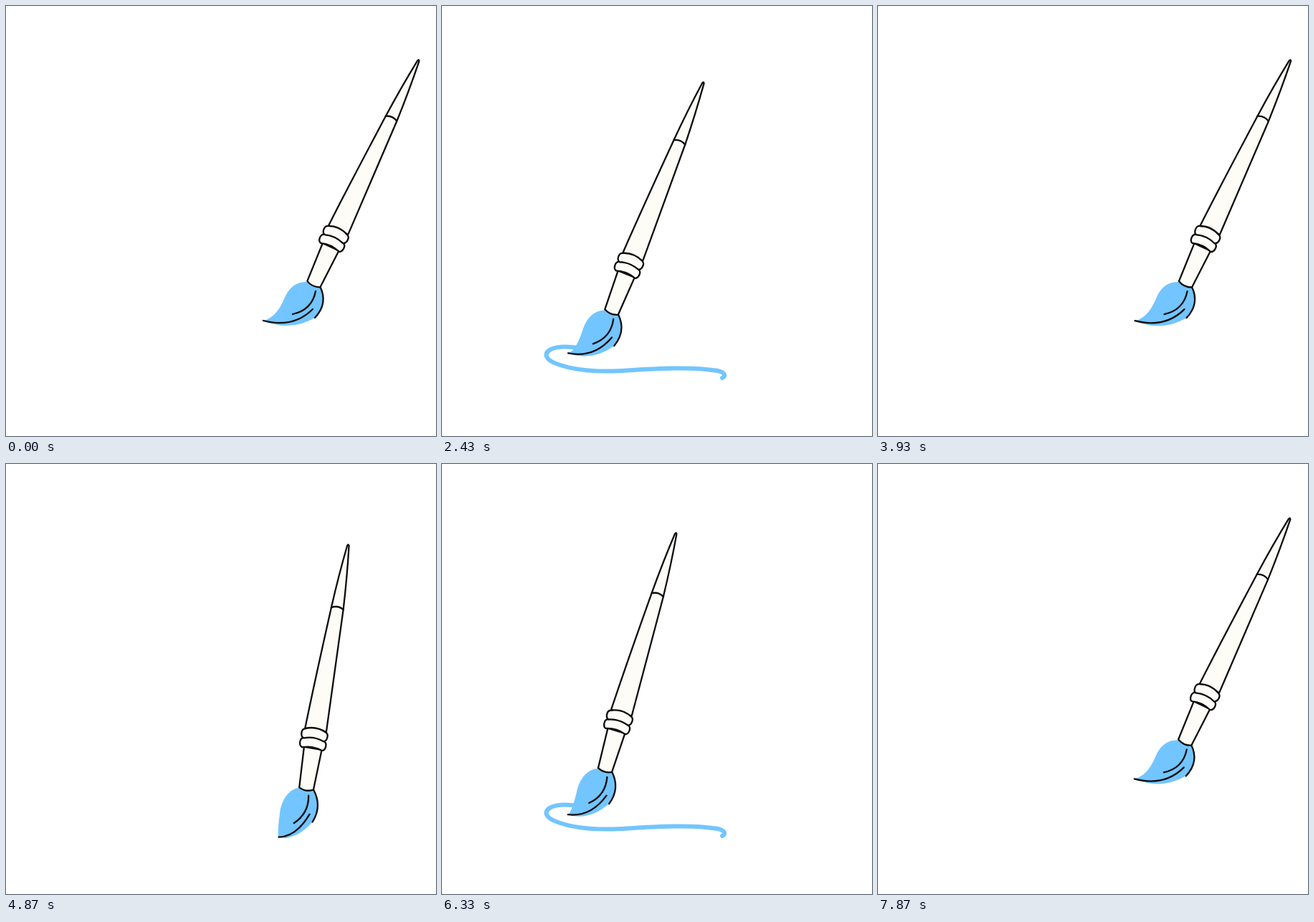
These frames come from a looping animation (600 by 600 pixels, 7.91 s). An HTML page:

```html
<!DOCTYPE html>
<html lang="en">
<head>
<meta charset="utf-8">
<title>Paint brush</title>
<style>
  html, body { margin: 0; width: 100%; height: 100%; overflow: hidden; background: #fff; }
  svg { display: block; width: 100vw; height: 100vh; }
  .paint { fill: #73c5ff; }
  .trail { fill: none; stroke: #73c5ff; stroke-width: 6; stroke-linecap: round; }
  .ink { fill: none; stroke: #0c0c0c; stroke-width: 2.3; stroke-linecap: round; stroke-linejoin: round; }
  .wood { fill: #fdfcf6; }
</style>
</head>
<body>
<svg viewBox="0 0 600 600">
  <path id="trail" class="trail" d="M391 519C397 516 394 511 385 509C345 503 300 506 250 509C215 511 185 508 162 500C144 494 141 485 152 479C160 475 172 475 182 476C195 477 205 479 214 483"/>
  <g id="brush">
    <path id="body" class="paint"/>
    <path id="lines" class="ink"/>
    <g id="handle" class="ink">
      <path class="wood" d="M-10 -1L-13 -58H12L10 -1Q0 4 -10 -1Z"/>
      <path class="wood" d="M-16 -84C-14 -150 -10.5 -215 -8.5 -256Q-6 -302 -1.2 -345Q0 -348 1.2 -345Q6 -302 8.5 -256C10 -215 12 -150 14 -84Z"/>
      <path d="M-8.5 -256Q0 -261 8.5 -256"/>
      <g transform="translate(-1.5)">
        <path id="ring" class="wood" d="M-14 -57C-19 -58 -20 -68 -15 -70Q0 -77 15 -70C20 -68 19 -58 14 -57Q0 -62 -14 -57Z"/>
        <use href="#ring" transform="translate(0 -13)"/>
      </g>
    </g>
  </g>
</svg>
<script>
const CYCLE = 3955;
const $ = id => document.getElementById(id);

// Bristles trailing left and trailing right; the second path of each is ink.
const trailLeft = [
  'M-10 -3Q-32 -4 -42 21Q-53 47 -71 51Q-34 67 1 47Q20 27 8 3',
  'M1 47Q20 27 8 3M-71 51Q-29 62 -2 35M2 10Q-3 36 -30 42'
];
const trailRight = [
  'M-8 1Q-25 8 -24 32Q-12 74 46 54Q33 46 26 28Q26 8 12 -4',
  'M26 28Q26 8 12 -4M46 54Q23 45 19 28M3 8Q18 20 14 44'
];

// Key poses: time, ferrule x, ferrule y, handle tilt, bristle swing
const keys = [
  [0, 430, 388, 25.1, 0],
  [560, 440, 457, 26, .16],
  [915, 420, 453, 9.8, .27],
  [1400, 276, 455, -9.4, 1],
  [1860, 122, 455, -19, .8],
  [2375, 228, 427, 16.6, .16],
  [2430, 237, 427, 21.8, .085],
  [2800, 277, 432, 27, 0],
  [3220, 278, 432, 27, 0],
  [CYCLE, 430, 388, 25.1, 0]
];

const mix = (a, b, k) => a + (b - a) * k;
const clamp = v => Math.max(0, Math.min(1, v));
const smooth = v => clamp(v) ** 2 * (3 - 2 * clamp(v));
const rate = (i, c) => (keys[i + 1][c] - keys[i][c]) / (keys[i + 1][0] - keys[i][0]);

// Smooth slope that never overshoots a key.
function slope(i, c) {
  if (i === 0 || i === keys.length - 1) return 0;
  const a = rate(i - 1, c), b = rate(i, c);
  return a * b <= 0 ? 0 : 2 * a * b / (a + b);
}

function track(t, c) {
  let i = 0;
  while (i < keys.length - 2 && t >= keys[i + 1][0]) i++;
  const span = keys[i + 1][0] - keys[i][0];
  const u = (t - keys[i][0]) / span;
  return mix(keys[i][c], keys[i + 1][c], smooth(u))
    + span * u * (1 - u) * ((1 - u) * slope(i, c) - u * slope(i + 1, c));
}

// Blend two paths; points far from the ferrule sag midway through the swing.
function swingPath(from, to, k) {
  const points = /(-?\d+) (-?\d+)/g;
  const ends = [...to.matchAll(points)];
  let n = 0;
  return from.replace(points, (_, x, y) => {
    const [, endX, endY] = ends[n++];
    const sag = k * (1 - k) * (x * x + y * y) / 95;
    return `${mix(+x, +endX, k)} ${mix(+y, +endY, k) + sag}`;
  });
}

function draw(t) {
  const [x, y, tilt, swing] = [1, 2, 3, 4].map(c => track(t, c));
  const [body, lines] = trailLeft.map((d, i) => swingPath(d, trailRight[i], swing));
  $('brush').setAttribute('transform', `translate(${x} ${y})`);
  $('handle').setAttribute('transform', `translate(-1 1) rotate(${tilt})`);
  $('body').setAttribute('d', body + 'Z');
  $('lines').setAttribute('d', lines);
  $('trail').setAttribute('stroke-dasharray', `${330 * smooth((t - 700) / 1900)} 999`);
  $('trail').setAttribute('opacity', t < 700 ? 0 : 1 - clamp((t - 3180) / 380));
}

const start = performance.now();
function tick() {
  draw((performance.now() - start) % CYCLE);
  requestAnimationFrame(tick);
}
tick();
</script>
</body>
</html>
```
